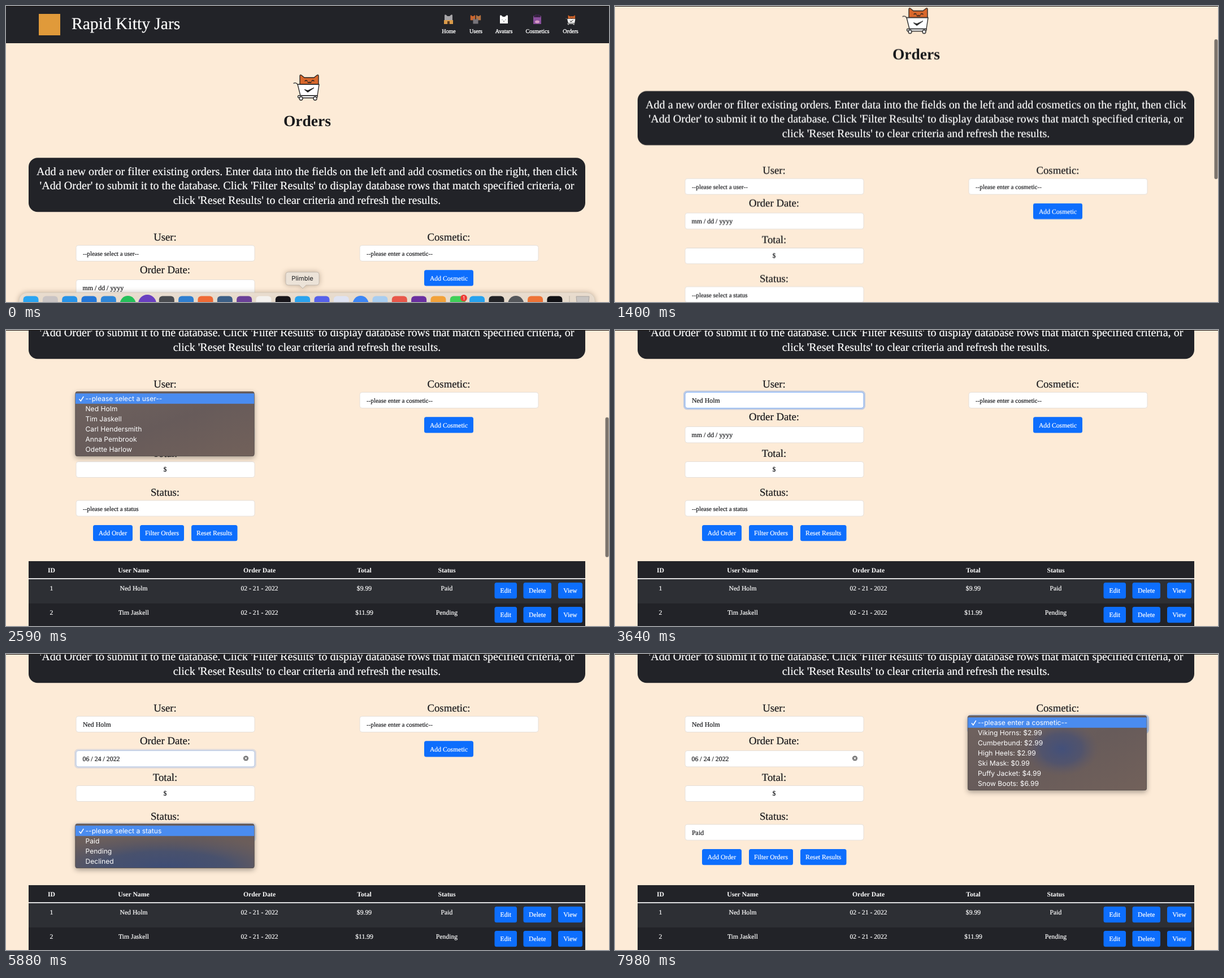
An HTML page for the animation above (8 s loop, 1067 px wide and 525 px high).

```html
<!DOCTYPE html>
<html lang="en">
<head>
<meta charset="utf-8">
<title>Orders</title>
<style>
html, body { margin: 0; width: 100%; height: 100%; overflow: hidden; background: #fdebd7; }
svg { display: block; width: 1067px; height: 525px; }
text { font-family: "Liberation Serif", "Noto Serif", serif; font-size: 11.7px; fill: #17181b; stroke: #17181b; stroke-width: .2px; text-rendering: geometricPrecision; }
.mid { text-anchor: middle; }
.light { fill: #fff; stroke: #fff; }
.bold { font-weight: 700; stroke: none; }
.nav { font-size: 10.1px; stroke-width: .35px; }
.label { font-size: 18.8px; }
.banner { font-size: 20.1px; }
.hint { font-size: 11.05px; }
.value { font-size: 11.9px; }
.btn rect { fill: #0d6efd; }
.btn text { fill: #fff; stroke: #fff; text-anchor: middle; }
.field { fill: #fff; stroke: #e6dfd8; stroke-width: 1px; }
.ring { fill: none; stroke: #86b7fe; stroke-width: 1px; }
.glow { fill: none; stroke: #0d6efd; stroke-opacity: .25; stroke-width: 3px; }
.ui text { font-family: Inter, "Liberation Sans", sans-serif; stroke: none; }
.menu text { font-size: 12.1px; fill: #fff; }
.cal text { font-size: 9.4px; font-weight: 500; text-anchor: middle; }
.shade { filter: drop-shadow(0 3px 5px rgba(0, 0, 0, .35)); }
.haze { filter: drop-shadow(0 0 5px rgba(90, 70, 50, .4)); }
.line { fill: none; stroke: #202020; stroke-width: 1.3px; stroke-linejoin: round; stroke-linecap: round; }

/* Every animation shares one 8 s loop */
.scroll, .anim { animation: 8s linear infinite; }
.scroll { animation-name: scroll; }
@keyframes scroll {
  0%, 10.5% { transform: translateY(0); animation-timing-function: cubic-bezier(.4, 0, .75, .5); }
  17.5% { transform: translateY(calc(var(--k) * 118px)); }
  21.875% { transform: translateY(calc(var(--k) * 268px)); animation-timing-function: cubic-bezier(.25, .5, .6, 1); }
  24.5%, 100% { transform: translateY(calc(var(--k) * 314px)); }
}
.bar { animation-name: bar; }
@keyframes bar { 0%, 10.5% { opacity: 0; } 11.375%, 32.375% { opacity: 1; } 35%, 100% { opacity: 0; } }
.dock { animation-name: dock; }
@keyframes dock { 0% { transform: none; } 4.375%, 100% { transform: translateY(36px); } }
.tip { animation-name: tip; animation-timing-function: step-end; }
@keyframes tip { 0% { opacity: 1; } .875%, 100% { opacity: 0; } }

.user-menu { animation-name: user-menu; }
@keyframes user-menu { 0%, 32.37% { opacity: 0; } 32.375%, 38% { opacity: 1; } 40.25%, 100% { opacity: 0; } }
.status-menu { animation-name: status-menu; }
@keyframes status-menu { 0%, 72.62% { opacity: 0; } 72.625%, 82.5% { opacity: 1; } 84.875%, 100% { opacity: 0; } }
.cosmetic-menu { animation-name: cosmetic-menu; }
@keyframes cosmetic-menu { 0%, 97.99% { opacity: 0; } 98%, 100% { opacity: 1; } }
.user-menu .hover { animation: user-hover 8s step-end infinite; }
@keyframes user-hover { 0% { transform: none; } 36.75%, 100% { transform: translateY(18px); } }
.status-menu .hover { animation: status-hover 8s step-end infinite; }
@keyframes status-hover { 0% { transform: none; } 77%, 100% { transform: translateY(18px); } }

.was { --a: 1; --b: 0; }
.now { --a: 0; --b: 1; }
.was, .now, .pick, .day { animation-timing-function: step-end; }
.user-text { animation-name: user-text; }
@keyframes user-text { 0% { opacity: var(--a); } 38.5%, 100% { opacity: var(--b); } }
.date-text { animation-name: date-text; }
@keyframes date-text { 0% { opacity: var(--a); } 63%, 100% { opacity: var(--b); } }
.status-text { animation-name: status-text; }
@keyframes status-text { 0% { opacity: var(--a); } 83.125%, 100% { opacity: var(--b); } }
.pick { animation-name: pick; }
@keyframes pick { 0% { opacity: 0; } 49% { opacity: 1; } 63%, 100% { opacity: 0; } }
.day { animation-name: day; }
@keyframes day { 0% { opacity: 0; } 54.25%, 100% { opacity: 1; } }

.user-ring { animation-name: user-ring; }
@keyframes user-ring { 0%, 32.375% { opacity: 0; } 34.25%, 49% { opacity: 1; } 50.875%, 100% { opacity: 0; } }
.date-ring { animation-name: date-ring; }
@keyframes date-ring { 0%, 49% { opacity: 0; } 50.875%, 72.625% { opacity: 1; } 74.5%, 100% { opacity: 0; } }
.status-ring { animation-name: status-ring; }
@keyframes status-ring { 0%, 72.625% { opacity: 0; } 74.5%, 91% { opacity: 1; } 92.9%, 100% { opacity: 0; } }
.cosmetic-ring { animation-name: cosmetic-ring; }
@keyframes cosmetic-ring { 0%, 98% { opacity: 0; } 99.75%, 100% { opacity: 1; } }
</style>
</head>
<body>
<svg viewBox="0 0 1067 525">
  <defs>
    <linearGradient id="warm" x2="1" y2="1">
      <stop offset="0" stop-color="#70635f"/><stop offset=".5" stop-color="#675b5a"/><stop offset="1" stop-color="#72615a"/>
    </linearGradient>
    <radialGradient id="cool">
      <stop offset="0" stop-color="#43507a"/><stop offset=".55" stop-color="#4a5172" stop-opacity=".75"/><stop offset="1" stop-color="#5c5767" stop-opacity="0"/>
    </radialGradient>
    <radialGradient id="dusk" cy="1" r=".75">
      <stop offset="0" stop-color="#3d4c76"/><stop offset=".5" stop-color="#45506f" stop-opacity=".9"/><stop offset="1" stop-color="#575563" stop-opacity="0"/>
    </radialGradient>
    <g id="cart">
      <path class="line" d="M520 139V124q0-3 3-1l5 4h17l5-4q3-2 3 1v15z" style="fill:#d9682c"/>
      <path class="line" d="M529 133q2-2 4 0M541 133q2-2 4 0M534 135q1.500 2 3 0q1.500 2 3 0"/>
      <path class="line" d="M509 137q4-2 7 2l5 20h30l3-20H516" style="fill:#fff"/>
      <path class="line" d="M517 159q-2 4 3 4h27q5 0 4-4z" style="fill:#fff"/>
      <circle class="line" cx="522" cy="164" r="3" style="fill:#fff"/>
      <circle class="line" cx="547" cy="164" r="3" style="fill:#fff"/>
      <path d="M528 148l6 5 11-8-11 5z" fill="#202020" stroke="#202020"/>
    </g>
    <path id="head" d="M-7 7V-6q0-3 3-1l2 2h4l2-2q3-2 3 1V7z"/>
  </defs>

  <g class="scroll" style="--k:-1">
    <rect width="1067" height="66" fill="#222328"/>
    <rect x="58" y="14" width="38" height="38" fill="#e09a3a"/>
    <text class="light" x="116" y="41" style="font-size:29.6px">Rapid Kitty Jars</text>
    <g transform="translate(783 24)">
      <use href="#head" y="-1" fill="#a7a5a8"/><rect x="-8" y="1" width="16" height="7" fill="#d99a4a"/><rect x="-2" y="3" width="4" height="5" fill="#553820"/>
    </g>
    <g transform="translate(831 24)">
      <use href="#head" transform="translate(-5 -3) scale(.6)" fill="#c9642e"/><use href="#head" transform="translate(5 -3) scale(.6)" fill="#b4713f"/><use href="#head" transform="translate(0 3) scale(.65)" fill="#77747a"/>
    </g>
    <g transform="translate(881 24)">
      <use href="#head" fill="#fff"/><path d="M-3 0v1M3 0v1M-1 3h2" stroke="#333"/>
    </g>
    <g transform="translate(940 25)">
      <use href="#head" fill="#8a4f9c"/><path d="M-6-6h12M-3-7v-2h6v2" stroke="#3c2348" stroke-width="2" fill="none"/><ellipse cy="3" rx="4" ry="2.500" fill="#d79bc4"/>
    </g>
    <use href="#cart" transform="translate(791.500 -31.500) scale(.39)"/>
    <g id="links"></g>

    <use href="#cart"/>
    <text class="mid bold" x="533" y="213" style="font-size:27.5px">Orders</text>
    <rect x="40" y="269.300" width="985" height="96" rx="16" fill="#222328"/>
    <g class="mid">
      <text class="banner light" x="532.5" y="299.5">Add a new order or filter existing orders. Enter data into the fields on the left and add cosmetics on the right, then click</text>
      <text class="banner light" x="532.5" y="325">'Add Order' to submit it to the database. Click 'Filter Results' to display database rows that match specified criteria, or</text>
      <text class="banner light" x="532.5" y="350.5">click 'Reset Results' to clear criteria and refresh the results.</text>
      <text class="label" x="281.5" y="416">User:</text>
      <text class="label" x="783.5" y="416">Cosmetic:</text>
      <text class="label" x="281.5" y="474">Order Date:</text>
      <text class="label" x="281.5" y="538.5">Total:</text>
      <text class="label" x="281.5" y="608">Status:</text>
    </g>
    <g id="fields"></g>
    <text class="hint anim was user-text" x="136" y="442.5">--please select a user--</text>
    <text class="value anim now user-text" x="136" y="442.5">Ned Holm</text>
    <text class="hint" x="638" y="442.5">--please enter a cosmetic--</text>
    <rect class="anim pick" x="133" y="491" width="24" height="16" fill="#acd0fa"/>
    <text class="value anim was date-text" x="135.5" y="503.5">mm / dd / yyyy</text>
    <g class="anim now date-text">
      <text class="value" x="135.5" y="503.5">06 / 24 / 2022</text>
      <circle cx="424.500" cy="499" r="4.600" fill="#767676"/>
      <path d="M422.700 497.200l3.600 3.600m0-3.600l-3.600 3.600" stroke="#fff" stroke-width="1.100"/>
    </g>
    <text class="value mid" x="281.5" y="565">$</text>
    <text class="hint anim was status-text" x="136" y="634.5">--please select a status</text>
    <text class="value anim now status-text" x="136" y="634.5">Paid</text>
    <g id="buttons"></g>
    <g id="table"></g>
  </g>

  <g class="anim bar"><rect class="scroll" style="--k:.49" x="1060.500" y="1" width="6" height="248" rx="3" fill="#7b736c"/></g>

  <g id="menus" class="ui"></g>

  <g class="ui cal anim pick" id="cal">
    <rect class="shade" x="123.500" y="198.500" width="220.500" height="201" rx="6" fill="#1c1c1d" stroke="#77726d" stroke-width="1.500"/>
    <path d="M152.500 218.500l-5 4.500 5 4.500M315 218.500l5 4.500-5 4.500M260.500 220.500l5 5 5-5" fill="none" stroke="#b5b5b5" stroke-width="1.100"/>
    <rect x="190.500" y="214" width="86" height="17.500" rx="1" fill="none" stroke="#d0d0d0"/>
    <text x="228" y="227" style="font-size:11px;fill:#eee">June 2022</text>
    <rect x="249" y="324" width="24.500" height="18.500" rx="2" fill="#58585a"/>
    <rect class="anim day" x="276.500" y="324.500" width="24.500" height="18" rx="2" fill="#3a3a3c" stroke="#d5d5d5"/>
  </g>

  <g class="ui">
    <g class="anim tip">
      <path class="haze" d="M499 472h51q4 0 4 4v15q0 4-4 4h-19l-6 6-6-6h-20q-4 0-4-4v-15q0-4 4-4z" fill="#ece3d8" stroke="#c4bab0"/>
      <text class="mid" x="524.5" y="487" style="font-size:11.2px">Plimble</text>
    </g>
    <g class="anim dock" id="dock">
      <rect class="haze" x="23" y="508.500" width="1019" height="60" rx="14" fill="#ebdfd1" fill-opacity=".92" stroke="#d8ccbe"/>
    </g>
  </g>
  <rect width="1067" height="1" fill="#15110e"/>
</svg>
<script>
const add = (id, html) => document.getElementById(id).insertAdjacentHTML('beforeend', html);
const into = (id, parts) => add(id, parts.join(''));
const text = (x, y, s, attrs = '') => `<text x="${x}" y="${y}" ${attrs}>${s}</text>`;
const box = (x, y, w, h, rx, attrs = '') =>
  `<rect x="${x}" y="${y}" width="${w}" height="${h}" rx="${rx}" ${attrs}/>`;
const button = (x, y, w, s) =>
  `<g class="btn">${box(x, y, w, 28.2, 3.5)}${text(x + w / 2, y + 18.3, s)}</g>`;

into('links', [[783.5, 'Home'], [831.5, 'Users'], [881, 'Avatars'], [940.5, 'Cosmetics'], [999, 'Orders']]
  .map(([x, s]) => text(x, 48, s, 'class="nav mid light"')));

into('fields', [[124, 424.5, 28, 'user'], [626, 424.5, 28, 'cosmetic'], [124, 485.5, 28.5, 'date'], [124, 547.5, 28], [124, 616.2, 28, 'status']]
  .map(([x, y, h, name]) => box(x, y, 316, h, 4, 'class="field"') + (name ?
    `<g class="anim ${name}-ring">${box(x - 1.5, y - 1.5, 319, h + 3, 5, 'class="glow"')}${box(x, y, 316, h, 4, 'class="ring"')}</g>` : '')));

into('buttons', [
  button(740, 468.2, 87, 'Add Cosmetic'), button(154, 660, 70, 'Add Order'),
  button(237, 660, 78, 'Filter Orders'), button(328, 660, 81.5, 'Reset Results')
]);

// Table
const cols = [80.5, 226, 448.5, 634, 780];
const cells = (y, list, cls) => list.map((s, i) => text(cols[i], y, s, `class="mid light ${cls}"`)).join('');
const row = (y, fill, list) => box(40, y, 985, 43, 0, `fill="${fill}"`) + cells(y + 19.5, list, '') +
  button(864.5, y + 6, 39.5, 'Edit') + button(915.5, y + 6, 49.5, 'Delete') + button(977, y + 6, 43, 'View');
into('table', [
  box(40, 724, 985, 31, 0, 'fill="#222328"'),
  cells(743.5, ['ID', 'User Name', 'Order Date', 'Total', 'Status'], 'bold'),
  row(756, '#2d2f34', [1, 'Ned Holm', '02 - 21 - 2022', '$9.99', 'Paid']),
  row(799, '#222328', [2, 'Tim Jaskell', '02 - 21 - 2022', '$11.99', 'Pending']),
  box(40, 754.3, 985, 1.7, 0, 'fill="#fff"')
]);

// Drop-down menus
const menu = (name, x, y, items, tint = '') => `<g class="menu anim ${name}-menu">
  ${box(x, y, 317, items.length * 18 + 7, 4, 'class="shade" fill="url(#warm)"')}${tint}
  ${box(x + .5, y + .5, 316, items.length * 18 + 6, 4, 'fill="none" stroke="#5d5552"')}
  ${box(x + .5, y + 3.5, 316, 18.3, 0, 'class="hover" fill="#4a8cf0"')}
  <path d="M${x + 7} ${y + 13.5}l2.800 3.500 5-8" fill="none" stroke="#fff" stroke-width="1.500"/>
  ${items.map((s, i) => text(x + 18, y + 17.3 + i * 18, s)).join('')}</g>`;
into('menus', [
  menu('user', 122.5, 109, ['--please select a user--', 'Ned Holm', 'Tim Jaskell', 'Carl Hendersmith', 'Anna Pembrook', 'Odette Harlow']),
  menu('status', 122.5, 301, ['--please select a status', 'Paid', 'Pending', 'Declined'],
    box(122.5, 301, 317, 79, 4, 'fill="url(#dusk)"')),
  menu('cosmetic', 624, 109, ['--please enter a cosmetic--', 'Viking Horns: $2.99', 'Cumberbund: $2.99', 'High Heels: $2.99',
    'Ski Mask: $0.99', 'Puffy Jacket: $4.99', 'Snow Boots: $6.99'],
    '<ellipse cx="790" cy="168" rx="66" ry="48" fill="url(#cool)"/>')
]);

// Calendar: six weeks from 29 May
const colX = c => 151 + c * 27.55;
['Sun', 'Mon', 'Tue', 'Wed', 'Thu', 'Fri', 'Sat'].forEach((s, c) =>
  add('cal', text(colX(c), 253.5, s, `style="fill:${c % 6 ? '#8c8c8c' : '#8f4a40'}"`)));
for (let i = 0; i < 42; i++) {
  const c = i % 7, n = i - 2, inside = n > 0 && n < 31;
  const day = n < 1 ? n + 31 : n > 30 ? n - 30 : n;
  const color = c % 6 ? (inside ? '#f2f2f2' : '#838383') : (inside ? '#f06b57' : '#7d463e');
  add('cal', text(colX(c), 274.5 + Math.floor(i / 7) * 20.9, day, `style="fill:${color};font-weight:${n === 23 ? 700 : 500}"`));
}

// Dock
const apps = ['#2aa5f2', '#c9c4c4', '#2793e8', '#2377d8', '#2f86d8', '#25c05a', '#6a3fc0', '#4a4c50', '#2f7fd0', '#ef6a35',
  '#3c5f86', '#6b4098', '#f4f1ee', '#17151a', '#2aa3ee', '#5661ea', '#dfe3f2', '#3d86f5', '#a8cdf0', '#e8574a',
  '#6a2fa0', '#f2a23a', '#3fcf58', '#26a2ee', '#222326', '#55575b', '#ee7336', '#101014'];
apps.forEach((fill, i) => {
  const x = 44 + i * 34.33;
  add('dock', [5, 6, 17, 25].includes(i)
    ? `<circle cx="${x}" cy="528" r="${i === 6 ? 16 : 14}" fill="${fill}"/>`
    : box(x - 13.5, 514.5, 27, 27, 6, `fill="${fill}"`));
});
add('dock', '<circle cx="810" cy="518" r="6" fill="#ee3d36"/>' + text(810, 521.2, 1, 'class="mid light" style="font-size:8.5px"') +
  '<path d="M997 514v20" stroke="#b9aea3"/><path d="M1009 515h23l-2 20h-19z" fill="#c9c5c2" stroke="#aaa5a1"/>');
</script>
</body>
</html>
```
